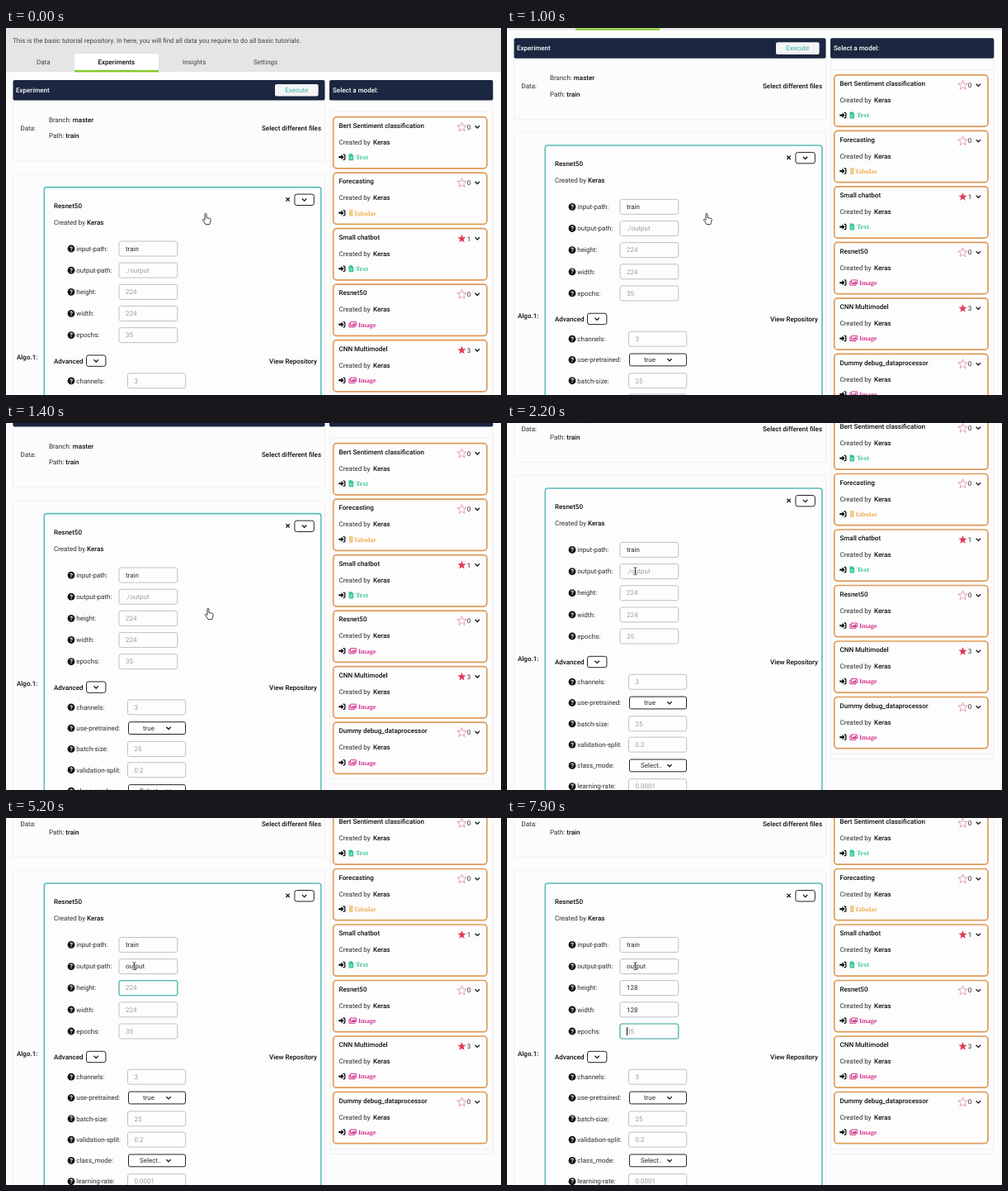
Animation, 600 px wide and 444 px high, one loop 8 s. Source, as an HTML page:

```html
<!DOCTYPE html>
<html lang="en">
<head>
<meta charset="utf-8">
<title>Experiment form</title>
<style>
  html, body { margin: 0; width: 100%; height: 100%; overflow: hidden; background: #fdfcfd; }
  svg { display: block; width: 600px; height: 444px; }
  text { font: 8px Roboto, sans-serif; fill: #2a2a2c; text-rendering: geometricPrecision; white-space: pre; }
  .b { font-weight: 500; fill: #0c0c10; }
  .tab { fill: #444; }
  .hint { fill: #9b9b9d; }
  .white { fill: #fff; }
  .tag { font: bold 8px "Liberation Serif", serif; }
  .mark { font-weight: 700; font-size: 7.5px; fill: #fff; text-anchor: middle; }
  .faint { fill: none; stroke: #f1eff1; }
  .box { fill: #fefdfe; stroke: #b9b9bb; stroke-width: .9; }
  .button { fill: #fff; stroke: #222226; }
  .line { fill: none; stroke: #15151a; stroke-width: 1.3; }
  .focus { fill: none; stroke: #4dbdb2; stroke-width: 1.2; }
</style>
</head>
<body>
<svg viewBox="0 0 600 444">
  <g id="page"></g>
  <path id="hand" fill="#fff" stroke="#222" stroke-width=".9" stroke-linejoin="round"
    d="M-1-5.7c0-1.4 2-1.4 2 0v4.2l4 .8c1 .3 1.3 1 1.2 2l-.7 3-.8 2.4H0c-.8-2-2.6-3.8-3.5-5.2-.5-1 .7-1.6 1.5-1l1 1z"/>
  <path id="beam" fill="none" stroke="#222" stroke-width=".9" d="M-2-4.3h1.4l.6.6.6-.6H2M0-3.7V3.7M-2 4.3h1.4l.6-.6.6.6H2"/>
</svg>
<script>
const $ = id => document.getElementById(id);

// Text is placed by its vertical centre.
const text = (x, y, s, cls = '', extra = '') =>
  `<text x="${x}" y="${y + 2.8}" class="${cls}" ${extra}>${s}</text>`;
const pair = (x, y, label, value) => text(x, y, `${label} <tspan class="b">${value}</tspan>`);
const rect = (x, y, w, h, r, attrs) =>
  `<rect x="${x}" y="${y}" width="${w}" height="${h}" rx="${r}" ${attrs}/>`;
const at = (x, y, inner) => `<g transform="translate(${x} ${y})">${inner}</g>`;
const chevron = (x, y) => at(x, y, '<path class="line" d="M-2.7-1.3L0 1.4 2.7-1.3"/>');
const dropdown = (x, y) => rect(x, y, 23.4, 13.4, 2.5, 'class="button"') + chevron(x + 11.7, y + 6.7);
const label = (y, s) =>
  `<circle cx="79" cy="${y}" r="4.4" fill="#111116"/>` + text(79, y - .1, '?', 'mark') + text(85.3, y, s);

const star = (x, y, filled) => {
  const points = Array.from({ length: 10 }, (_, i) => {
    const r = (i % 2 ? .42 : 1) * (filled ? 5.4 : 6), a = i * Math.PI / 5;
    return `${x + r * Math.sin(a)},${y - r * Math.cos(a)}`;
  });
  return `<polygon points="${points}" ` +
    (filled ? 'fill="#e23a55"/>' : 'fill="#fff" stroke="#e4929f" stroke-width=".9"/>');
};

const tags = {
  Text: ['#34c596', 424, '<path fill="#34c596" d="M-2.8-4h3.6l2 2v6h-5.6z"/><path stroke="#fff" stroke-width=".6" d="M-1.5 0h3M-1.5 1.8h3"/>'],
  Tabular: ['#e9ae4c', 421.5, '<path stroke="#e9ae4c" stroke-width="1.4" d="M-1.3-4v8M1-4v8"/>'],
  Image: ['#d3358f', 427, '<path fill="none" stroke="#d3358f" d="M-.9-3.1h7v4.6h-7zM-1.2-1.5h-1.3v4.7h7v-1"/><path fill="#d3358f" d="M0 .8l1.5-1.8 1 .9 1.6-2 1.5 2.9z"/>'],
};

function modelCard([title, tag, stars], i) {
  const y = 107.6 + i * 67.5, [color, x, icon] = tags[tag];
  return rect(396.7, y, 186.2, 62.2, 4, 'fill="#fefdfe" stroke="#df9b57" stroke-width="1.7"') +
    text(403.5, y + 10.5, title, 'b') +
    star(552.5, y + 12.4, stars > 0) + text(558.8, y + 12.2, stars) + chevron(571.3, y + 12) +
    text(403.5, y + 30.4, 'Created by') + text(445, y + 30.4, 'Keras', 'b') +
    at(407.3, y + 48.6, '<path fill="#111" d="M-4-1.1h3v-2L2.3 0-1 3.1v-2h-3z"/><path class="line" d="M1.2-3.1h1.3q1 0 1 1v4.2q0 1-1 1H1.2"/>') +
    at(418.3, y + 48.6, icon) + text(x, y + 48.6, tag, 'tag', `style="fill:${color}"`);
}

const models = [
  ['Bert Sentiment classification', 'Text', 0], ['Forecasting', 'Tabular', 0],
  ['Small chatbot', 'Text', 1], ['Resnet50', 'Image', 0],
  ['CNN Multimodel', 'Image', 3], ['Dummy debug_dataprocessor', 'Image', 0],
];

const basic = [['input-path:', 'train'], ['output-path:', './output'], ['height:', '224'], ['width:', '224'], ['epochs:', '35']];
const basicField = ([name, value], i) => {
  const y = 267 + i * 26.15;
  return label(y, name) + rect(137, y - 9, 70.8, 18, 2.5, 'class="box"') +
    rect(137, y - 9, 70.8, 18, 2.5, `class="focus" id="focus${i}" opacity="0"`) +
    text(145, y, value, i ? 'hint' : '', `id="value${i}"`) +
    rect(145, y - 5, .9, 10, 0, `id="caret${i}" opacity="0"`);
};

const advanced = [['channels:', '3'], ['use-pretrained:', 'true', 166], ['batch-size:', '25'],
  ['validation-split:', '0.2'], ['class_mode:', 'Select..', 162], ['learning-rate:', '0.0001']];
const advancedField = ([name, value, selectX], i) => {
  const y = 426.8 + i * 25.3;
  return label(y, name) + (selectX
    ? rect(148.5, y - 7.4, 69, 14.8, 2, 'class="button"') + text(selectX, y, value) + chevron(197, y)
    : rect(147.5, y - 9, 70.2, 18, 2.5, 'class="box"') + text(155.5, y, value, 'hint'));
};

$('page').innerHTML = [
  rect(0, 0, 600, 53, 0, 'fill="#e6e5e6"'),
  text(8, 15.6, 'This is the basic tutorial repository. In here, you will find all data you require to do all basic tutorials.', 'tab'),
  '<path fill="#fff" d="M83 53V34q0-3 3-3h96q3 0 3 3v19z"/>',
  rect(83, 51, 102, 2.4, 0, 'fill="#83c92c"'),
  text(37, 41.5, 'Data', 'tab'), text(111.5, 41, 'Experiments', 'b'),
  text(214, 41.5, 'Insights', 'tab'), text(300, 41.5, 'Settings', 'tab'),

  rect(8.5, 80, 378, 81, 0, 'class="faint"'), rect(8.5, 177, 378, 500, 0, 'class="faint"'),
  rect(392.5, 80, 197.5, 440, 0, 'class="faint"'), rect(392.5, 101, 197.5, 413, 0, 'class="faint"'),
  rect(8.5, 63, 378, 24.5, 2, 'fill="#1b2740"'), rect(392, 63, 198.3, 24.5, 2, 'fill="#1b2740"'),
  text(12, 75, 'Experiment', 'b white'), text(396, 75, 'Select a model:', 'b white'),
  rect(326, 68, 52.6, 14.6, 2, 'fill="#f5f4f6"'),
  text(352.3, 75.2, 'Execute', '', 'style="fill:#32b5a8" text-anchor="middle"'),

  text(17.5, 121.3, 'Data:'), pair(52, 110.7, 'Branch:', 'master'), pair(52, 130.5, 'Path:', 'train'),
  text(310, 121.2, 'Select different files', 'b'),

  text(13, 398.4, 'Algo.1:', 'b'),
  rect(46.3, 192.6, 335.6, 500, 3, 'fill="#fefdfe" stroke="#5cbcb9" stroke-width="1.6"'),
  text(58, 214.7, 'Resnet50', 'b'), pair(58, 234.8, 'Created by', 'Keras'),
  '<path class="line" stroke-width="1.5" d="M339.4 205.2l4.4 4.4M343.8 205.2l-4.4 4.4"/>',
  dropdown(349.9, 201.1),
  ...basic.map(basicField),
  text(58, 402.8, 'Advanced', 'b'), dropdown(97.5, 395.9), text(319, 402.8, 'View Repository', 'b'),
  ...advanced.map(advancedField),
  ...models.map(modelCard),
].join('');

// One entry per field that receives focus; each key time adds a letter.
const entries = [
  { row: 1, focus: 2400, word: 'output', keys: [3300, 3600, 3800, 4000, 4200, 4400] },
  { row: 2, focus: 4700, word: '128', keys: [5500, 5700, 6000] },
  { row: 3, focus: 6300, word: '128', keys: [6900, 7000, 7200] },
  { row: 4, focus: 7500, word: '', keys: [] },
];

const clamp = v => Math.min(1, Math.max(0, v));
const ease = (t, from, to) => {
  const p = clamp((t - from) / (to - from));
  return p * p * (3 - 2 * p);
};

function drawEntry({ row, focus, word, keys }, i, t) {
  const blur = entries[i + 1]?.focus ?? Infinity;
  const pressed = keys.filter(k => k <= t);
  const value = $('value' + row), caret = $('caret' + row);
  value.textContent = word.slice(0, pressed.length) || basic[row][1];
  value.setAttribute('class', pressed.length ? '' : 'hint');

  const active = t >= focus && t < blur;
  const sinceKey = t - (pressed.at(-1) ?? focus);
  caret.setAttribute('opacity', active && sinceKey % 1000 < 500 ? 1 : 0);
  caret.setAttribute('x', 145 + (pressed.length ? value.getComputedTextLength() : 0));
  $('focus' + row).setAttribute('opacity',
    clamp((t - focus + 100) / 200) * (1 - clamp((t - blur + 100) / 200)));
}

function draw(now) {
  const t = Math.floor(now % 8000 / 100) * 100;
  const scroll = 77.3 * ease(t, 770, 1150) + 36.3 * ease(t, 1300, 1700);
  $('page').setAttribute('transform', `translate(0 ${-scroll})`);
  entries.forEach((entry, i) => drawEntry(entry, i, t));

  const move = ease(t, 1400, 2100);
  const x = 242 + 3 * ease(t, 1000, 1200) - 89.5 * move, y = 231 - 51.8 * move;
  const overField = move > .9;
  for (const id of ['hand', 'beam']) {
    $(id).setAttribute('transform', `translate(${x} ${y})`);
    $(id).setAttribute('visibility', (id === 'beam') === overField ? 'visible' : 'hidden');
  }
}

function loop() {
  draw(performance.now());
  requestAnimationFrame(loop);
}
loop();
</script>
</body>
</html>
```
